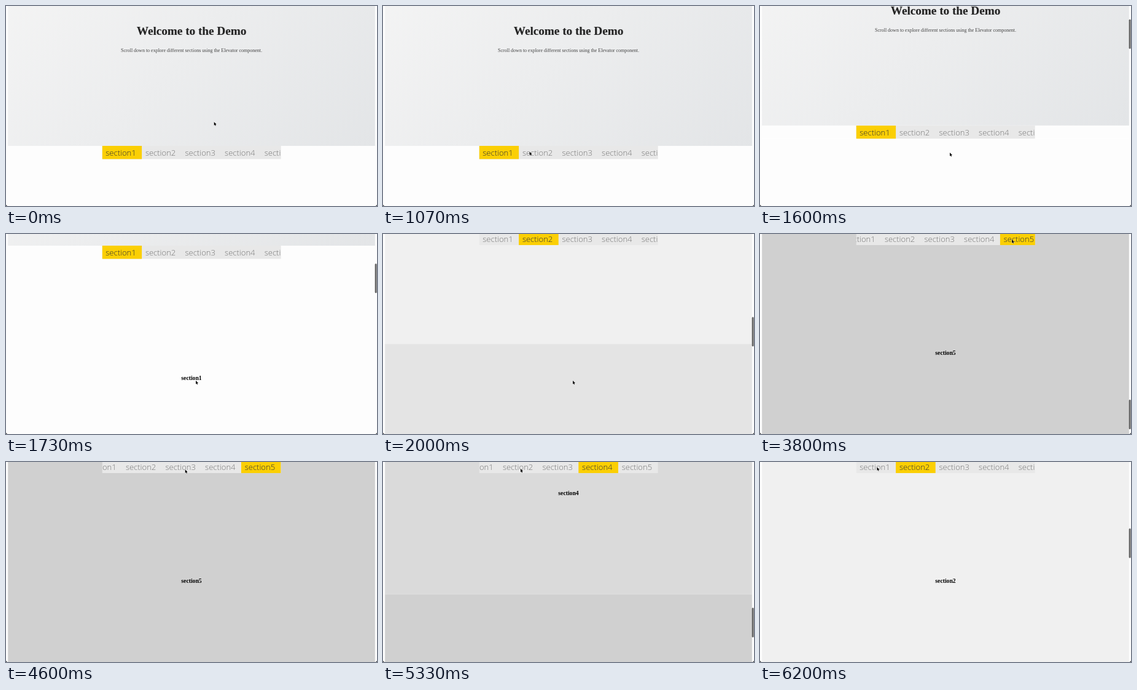
An HTML page with a canvas that plays this animation: 604 by 326 pixels, repeating every 6270 ms.

```html
<!DOCTYPE html>
<html lang="en">
<head>
<meta charset="utf-8">
<title>Elevator demo</title>
<style>
html, body { margin: 0; width: 100%; height: 100%; overflow: hidden; background: #fdfdfd; }
canvas { display: block; width: 604px; height: 326px; }
</style>
</head>
<body>
<canvas id="stage"></canvas>
<script>
const W = 604, H = 326, LOOP = 6270, STEP = 1000 / 15;
const canvas = document.getElementById('stage');
const ctx = canvas.getContext('2d');
const dpr = window.devicePixelRatio || 1;
canvas.width = W * dpr;
canvas.height = H * dpr;

const SERIF = '"Liberation Serif", serif';
const SANS = '"Open Sans", "Noto Sans", sans-serif';
const EDGE = 3.2;
const HERO = { top: -98, height: 326 };
const NAV = { x: 156.5, y: 228, w: 291.3, h: 21.7, tab: 64.6, stick: -3.5 };
const SECTION = { top: 250, height: 358 };
const SHADES = ['#fdfdfd', '#f0f0f0', '#e4e4e4', '#dadada', '#d0d0d0'];
const PAGE = SECTION.top + SHADES.length * SECTION.height - HERO.top;
const sectionTop = i => SECTION.top + i * SECTION.height;

const progress = (t, a, b) => Math.min(1, Math.max(0, (t - a) / (b - a)));
const smooth = u => u * u * (3 - 2 * u);
const smoother = u => u * u * u * (u * (6 * u - 15) + 10);
const ease = (t, a, b) => smooth(progress(t, a, b));

const WHEEL = [1473, 2244], JUMP_DOWN = [3024, 3696], JUMP_UP = [5140, 5812];

function scrollAt(t) {
  return sectionTop(2) * smoother(progress(t, ...WHEEL))
    + 2 * SECTION.height * ease(t, ...JUMP_DOWN)
    - 3 * SECTION.height * ease(t, ...JUMP_UP);
}

function navScrollAt(t) {
  return 16 * (ease(t, 2280, 2400) + ease(t, 3745, 3855)) - 32 * ease(t, 5860, 6000);
}

// The bar shows at once and fades shortly after each scroll
function barAlpha(t) {
  const last = [WHEEL, JUMP_DOWN, JUMP_UP].filter(span => t >= span[0]).pop();
  return last ? 1 - progress(t, last[1] + 560, last[1] + 740) : 0;
}

function pointerAt(t) {
  const legs = [
    { from: 0, to: 667, x: 168, y: 236 },
    { from: 733, to: 1400, x: 309, y: 239 },
    { from: 2400, to: 2867, x: 408, y: 9 },
    { from: 3267, to: 3400, x: 410, y: 9 },
    { from: 4230, to: 4733, x: 267, y: 13 },
    { from: 4800, to: 5067, x: 224, y: 11 },
    { from: 5870, to: 6180, x: 190.5, y: 8.3 }
  ];
  let x = 338.7, y = 189;
  for (const leg of legs) {
    const u = ease(t, leg.from, leg.to);
    x += (leg.x - x) * u;
    y += (leg.y - y) * u;
  }
  return [x, y];
}

function rect(x, y, w, h, color) {
  ctx.fillStyle = color;
  ctx.fillRect(x, y, w, h);
}

function text(str, x, y, font, color, align = 'center') {
  ctx.font = font;
  ctx.fillStyle = color;
  ctx.textAlign = align;
  ctx.fillText(str, x, y);
}

function drawHero(scroll) {
  const y = HERO.top - scroll;
  if (y + HERO.height < 0) return;
  const cx = W / 2, cy = y + HERO.height / 2, d = 231;
  const fill = ctx.createLinearGradient(cx - d, cy - d, cx + d, cy + d);
  fill.addColorStop(0, '#f5f5f5');
  fill.addColorStop(1, '#e3e5e7');
  rect(EDGE, y, W - 2 * EDGE, HERO.height, fill);

  ctx.save();
  ctx.shadowColor = 'rgba(0,0,0,.2)';
  ctx.shadowOffsetX = ctx.shadowOffsetY = 0.6 * dpr;
  ctx.shadowBlur = 1.2 * dpr;
  text('Welcome to the Demo', cx, 46.8 - scroll, 'bold 19.2px ' + SERIF, '#222');
  ctx.restore();
  text('Scroll down to explore different sections using the Elevator component.',
    cx, 74.8 - scroll, '8px ' + SERIF, '#444');
}

function drawSections(scroll) {
  SHADES.forEach((shade, i) => {
    const y = sectionTop(i) - scroll;
    if (y > H || y + SECTION.height < 0) return;
    rect(EDGE, y, W - 2 * EDGE, SECTION.height, shade);
    text('section' + (i + 1), W / 2, y + 196.7, 'bold 9.7px ' + SERIF, '#000');
  });
}

function drawNav(scroll, offset) {
  const y = Math.max(NAV.y - scroll, NAV.stick);
  const active = Math.max(0, Math.floor((scroll + 0.5 - SECTION.top) / SECTION.height));
  ctx.save();
  ctx.beginPath();
  ctx.rect(NAV.x, y, NAV.w, NAV.h);
  ctx.clip();
  rect(NAV.x, y, NAV.w, NAV.h, '#e8e8e8');
  SHADES.forEach((_, i) => {
    const x = NAV.x + i * NAV.tab - offset;
    if (i === active) rect(x, y, NAV.tab, NAV.h, '#fbcf04');
    text('section' + (i + 1), x + 5.8, y + 16, '300 13px ' + SANS,
      i === active ? '#333' : '#777', 'left');
  });
  ctx.restore();
}

function drawBar(scroll, alpha) {
  const track = H - 4;
  const y = 2 + (scroll - HERO.top) / PAGE * track;
  ctx.globalAlpha = alpha;
  ctx.fillStyle = '#666';
  ctx.beginPath();
  ctx.roundRect(600.6, y, 3, track * H / PAGE - 1, 1.5);
  ctx.fill();
  ctx.globalAlpha = 1;
}

function drawPointer([x, y]) {
  const shape = [[0, 0], [0, 5.7], [1.3, 4.5], [2.1, 6.5], [3.1, 6.1], [2.3, 4.2], [4, 4.1]];
  ctx.beginPath();
  shape.forEach(([dx, dy]) => ctx.lineTo(x + dx, y + dy));
  ctx.closePath();
  ctx.lineJoin = 'round';
  ctx.lineWidth = 0.9;
  ctx.strokeStyle = 'rgba(255,255,255,.8)';
  ctx.stroke();
  ctx.fillStyle = '#000';
  ctx.fill();
}

function drawCorners() {
  const r = 3;
  ctx.fillStyle = '#000';
  for (const [x, dir] of [[0, 1], [W, -1]]) {
    ctx.beginPath();
    ctx.moveTo(x, H - r);
    ctx.quadraticCurveTo(x, H, x + dir * r, H);
    ctx.lineTo(x, H);
    ctx.fill();
  }
}

function draw(t) {
  const scroll = scrollAt(t);
  ctx.setTransform(dpr, 0, 0, dpr, 0, 0);
  rect(0, 0, W, H, '#fdfdfd');
  drawSections(scroll);
  drawHero(scroll);
  drawNav(scroll, navScrollAt(t));
  drawBar(scroll, barAlpha(t));
  drawPointer(pointerAt(t));
  drawCorners();
}

const start = performance.now();
function tick() {
  const t = Math.max(0, performance.now() - start) % LOOP;
  draw(Math.min(93, Math.floor((t + 4) / STEP)) * STEP);
  requestAnimationFrame(tick);
}
tick();
</script>
</body>
</html>
```
